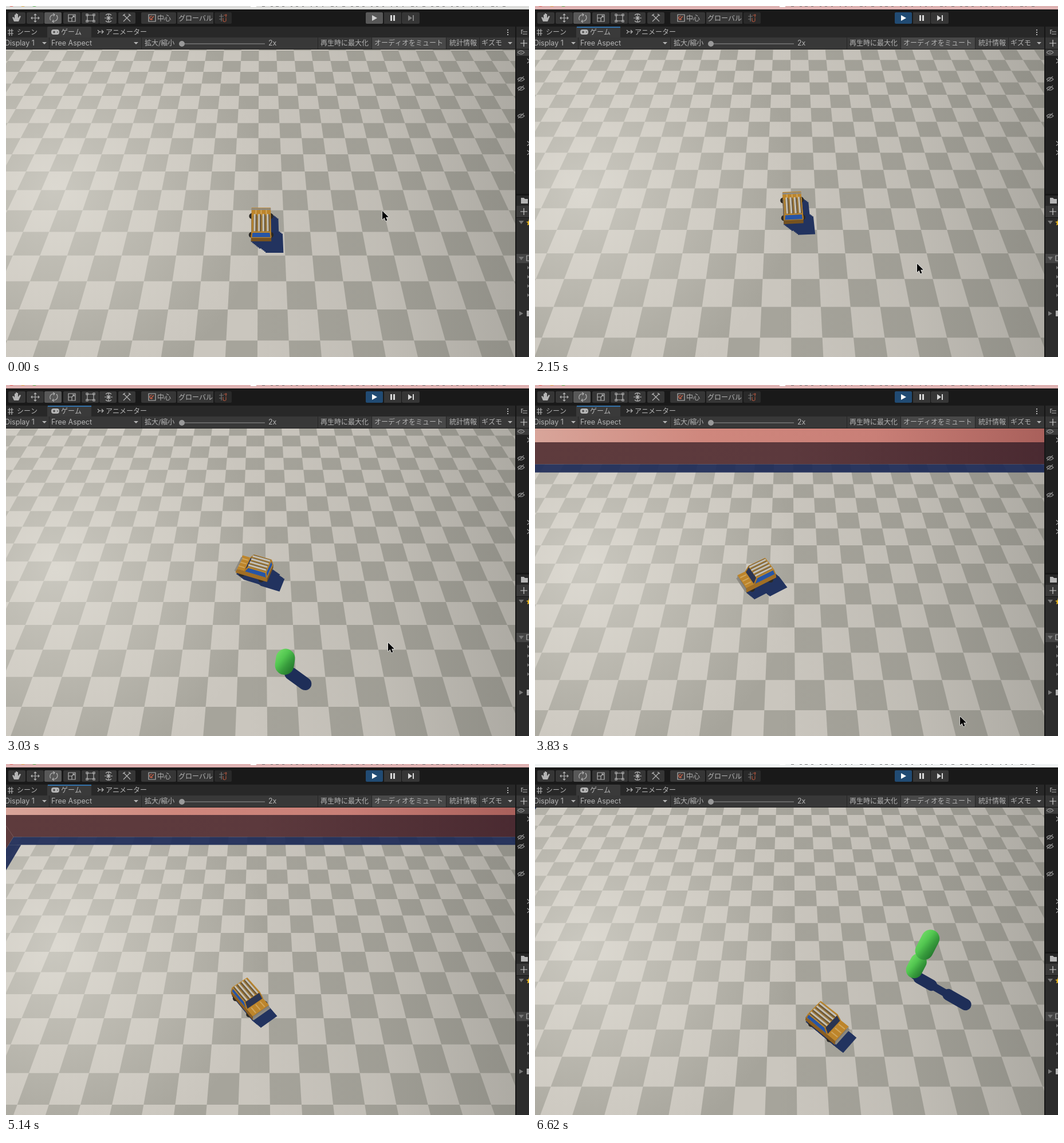
Recreate the animation shown at these times as an HTML page with a canvas. Size 913x613 px, loop 6.72 s.

```html
<!DOCTYPE html>
<html lang="ja">
<head>
<meta charset="utf-8">
<style>
  html, body { margin: 0; height: 100%; overflow: hidden; background: #191919; }
  canvas { display: block; }
</style>
</head>
<body>
<canvas id="stage" width="913" height="613"></canvas>
<script>
const c = document.getElementById('stage').getContext('2d');
const LOOP = 6720, STEP = 87.7, START = 1618;

// step, camera x, camera z, car x and z relative to the camera, heading in degrees
const KEYS = [
  [-1, .1, 0, .02, -9.78, 0],
  [6, -.05, .91, .12, -9.01, 3],
  [16, -.21, 4.6, -.25, -8.13, 70],
  [25, -1.18, 8.71, -1.32, -8.54, 122],
  [32, -3.16, 10.41, -1.25, -9.85, 196],
  [47, -4.6, 5.55, .43, -11, 225],
  [57, -2.23, 1.63, 1.32, -11.5, 227]
];
const WALL_Z = 7.58, WALL_X = -17.45, WALL_H = 1.29, WALL_DEPTH = 2.42;
const cam = { x: 0, z: 0 };

// Smooth curve through the keys
function pose(n) {
  n = Math.max(-1, Math.min(57, n));
  let i = 0;
  while (i < KEYS.length - 2 && n > KEYS[i + 1][0]) i++;
  const a = KEYS[i], b = KEYS[i + 1], h = b[0] - a[0], s = (n - a[0]) / h;
  const before = KEYS[Math.max(0, i - 1)], after = KEYS[Math.min(KEYS.length - 1, i + 2)];
  return a.map((v, k) => {
    const m0 = i ? (b[k] - before[k]) / (b[0] - before[0]) : 0;
    const m1 = (after[k] - v) / (after[0] - a[0]);
    return v * (1 + 2 * s) * (1 - s) ** 2 + b[k] * s * s * (3 - 2 * s)
      + h * s * (1 - s) * (m0 * (1 - s) - m1 * s);
  });
}

// Tilted camera: world units are floor tiles
function project(x, z, y = 0) {
  const d = 16.917 + z - cam.z, up = 11.914 - y;
  const scale = 625.9 / (.5695 * d + .822 * up);
  return [444.5 + (x - cam.x) * scale, 344.5 + (.5695 * up - .822 * d) * scale, scale];
}

function poly(points, fill) {
  c.beginPath();
  points.forEach(p => c.lineTo(p[0], p[1]));
  c.closePath();
  c.fillStyle = fill;
  c.fill();
}

function line(points, color, width) {
  c.beginPath();
  points.forEach(p => c.lineTo(p[0], p[1]));
  c.strokeStyle = color;
  c.lineWidth = width;
  c.stroke();
}

function rect(x, y, w, h, fill, r = 0) {
  c.fillStyle = fill;
  c.beginPath();
  c.roundRect(x, y, w, h, r);
  c.fill();
}

function gradient(g, ...stops) {
  stops.forEach((s, i) => g.addColorStop(i / (stops.length - 1), s));
  return g;
}

const quad = (x0, x1, z0, z1, y = 0) =>
  [project(x0, z0, y), project(x1, z0, y), project(x1, z1, y), project(x0, z1, y)];

function floor() {
  rect(0, 76, 889, 537, '#cac6be');
  const x0 = Math.floor(cam.x) - 17, z0 = Math.floor(cam.z) - 17;
  for (let x = x0; x < x0 + 36; x++)
    for (let z = z0; z < z0 + 23; z++)
      if ((x + z) % 2 === 0) poly(quad(x, x + 1, z, z + 1), '#a6a49b');
  rect(0, 76, 889, 537, gradient(c.createRadialGradient(85, 320, 0, 85, 320, 370),
    'rgba(238,236,228,.5)', 'rgba(230,227,218,.3)', 'rgba(230,227,218,0)'));
  rect(0, 76, 889, 537, gradient(c.createLinearGradient(420, 0, 889, 0),
    'rgba(70,72,68,0)', 'rgba(70,72,68,.07)', 'rgba(70,72,68,.22)'));
}

function walls() {
  const shade = 'rgba(26,40,86,.9)', right = 25;
  poly(quad(WALL_X, right, WALL_Z - .67, WALL_Z), shade);
  poly(quad(WALL_X, WALL_X + .66, -20, WALL_Z - .67), shade);
  poly(quad(WALL_X - 9, right + 9, WALL_Z + WALL_DEPTH, WALL_Z + 14, WALL_H), '#8c8e8b');
  poly(quad(WALL_X, right, WALL_Z, WALL_Z + WALL_DEPTH, WALL_H),
    gradient(c.createLinearGradient(0, 0, 889, 0), '#d8a59a', '#cf877d', '#c97f77', '#a9605b'));
  const face = gradient(c.createLinearGradient(0, 0, 889, 0), '#5e3b3d', '#5c393d', '#4a2a31');
  const wallFace = (x0, z0, x1, z1) => poly([project(x0, z0), project(x1, z1),
    project(x1, z1, WALL_H), project(x0, z0, WALL_H)], face);
  wallFace(WALL_X, WALL_Z, right, WALL_Z);
  wallFace(WALL_X, cam.z - 14, WALL_X, WALL_Z);
}

function car(x, z, degrees) {
  const a = degrees * Math.PI / 180, sin = Math.sin(a), cos = Math.cos(a);
  const place = (u, w, y) => project(x - u * sin + w * cos, z + u * cos + w * sin, y);
  const cast = (u, w, y) => project(x - u * sin + w * cos + y * .82, z + u * cos + w * sin - y * .74);
  const ring = (f, front, back, w, y) => [f(front, w, y), f(front, -w, y), f(back, -w, y), f(back, w, y)];
  const facing = p => (p[1][0] - p[0][0]) * (p[2][1] - p[0][1]) - (p[1][1] - p[0][1]) * (p[2][0] - p[0][0]) < 0;

  function box(low, high, sides, top) {
    const b = ring(place, ...low), t = ring(place, ...high);
    b.forEach((p, i) => {
      const j = (i + 1) % 4, f = [p, b[j], t[j], t[i]];
      if (facing(f)) poly(f, sides[i]);
    });
    poly(t, top);
  }

  for (let y = 0; y <= .66; y += .06)
    poly(ring(cast, y < .4 ? .66 : .15, -.66, y < .4 ? .38 : .33, y), '#22335f');

  for (const w of [-.36, .36]) for (const u of [-.42, .42]) {
    const [px, py] = place(u, w, .12);
    c.fillStyle = '#2b2926';
    c.beginPath();
    c.arc(px, py, 5, 0, 7);
    c.fill();
  }
  box([.68, -.68, .38, .1], [.66, -.68, .37, .36], ['#85827a', '#a06e25', '#76521f', '#8a5d20'], '#bd852b');
  for (const w of [-.2, 0, .2]) line([place(.35, w, .37), place(.62, w, .37)], '#cfa55c', 2);
  line([place(.7, -.38, .2), place(.7, .38, .2)], '#8d8a82', 3);
  box([.3, -.65, .36, .36], [.14, -.6, .33, .64], ['#2b3552', '#2655a6', '#2655a6', '#2655a6'], '#9a7638');
  const low = ring(place, .3, -.65, .36, .36), roof = ring(place, .14, -.6, .33, .64);
  low.forEach((p, i) => {
    const j = (i + 1) % 4;
    if (facing([p, low[j], roof[j], roof[i]])) {
      line([p, roof[i]], '#ad7826', 2);
      line([low[j], roof[j]], '#ad7826', 2);
    }
  });
  line([...roof, roof[0]], '#bb852c', 2);
  for (let w = -.24; w < .3; w += .16) {
    line([place(.16, w + .05, .66), place(-.58, w + .05, .66)], '#64533a', 2);
    line([place(.16, w, .68), place(-.58, w, .68)], '#c2bfb6', 3);
  }
}

// Each part is a [low, high] pair of heights along the pillar
function pillar(x, z, parts) {
  const shadow = (low, high, width) => {
    const p = project(x + low * .77, z - low * .6), q = project(x + high * .77, z - high * .6);
    line([p, q], '#1e2e58', p[2] * width);
  };
  c.lineCap = 'round';
  shadow(.1, parts.at(-1)[1], .3);
  for (const [low, high] of parts) shadow(low, high, .44);
  for (const [low, high] of parts) {
    const p = project(x, z, low), q = project(x, z, high), r = q[2] * .31;
    const g = c.createLinearGradient(q[0] - r * .8, q[1] - r * .6, q[0] + r, q[1] + r * .9);
    line([p, q], gradient(g, '#6cd863', '#52c650', '#379b3c', '#257a2e'), r * 2);
  }
  c.lineCap = 'butt';
}

const INK = '#b4b4b4';

function text(s, x, y, size = 12) {
  c.font = size + 'px Inter, "Noto Sans CJK JP", sans-serif';
  c.fillStyle = INK;
  c.fillText(s, x, y);
}

function path(d, color, fill) {
  const p = new Path2D(d);
  c.lineWidth = 1.2;
  c.strokeStyle = c.fillStyle = color;
  fill ? c.fill(p) : c.stroke(p);
}

function toolbar(playing, tint) {
  rect(0, 0, 913, 76, '#191919');
  rect(0, 0, 913, 6, tint);
  if (tint !== '#f1f4f5')
    ['#e5635a', '#e0b04a', '#58b954'].forEach((s, i) => rect(5 + i * 20, -7, 9, 8, s, 4));
  rect(427, 0, 10, 2, '#fff');
  for (let x = 447; x < 880; x += 9 + x % 7) rect(x, 0, 2 + x % 4, 1, '#777');

  [4, 36, 67, 100, 132, 163, 196].forEach((x, i) => rect(x, 11, 30, 20, i === 2 ? '#585858' : '#363636', 2));
  rect(236, 11, 61, 20, '#363636', 2);
  rect(299, 11, 63, 20, '#363636');
  rect(364, 11, 30, 20, '#292929', 2);
  path('M14 27L11 20l2-1 2 3V15h2v5V13h2v7V14h2v7l3-4 2 1-4 9z', INK, true);
  path('M44 21h14M51 14v14M46 19l-2 2 2 2M56 19l2 2-2 2M49 16l2-2 2 2M49 26l2 2 2-2', INK);
  path('M78 25a6 6 0 0 1 2-9l5-1M88 16a6 6 0 0 1-2 10l-5 1M82 13l3 2-2 3M84 29l-3-2 2-3', INK);
  path('M109 15h12v12h-12zM109 21h6v6M115 21l4-4M116 17h3v3', INK);
  path('M142 16h11v10h-11zM140 14h3v3h-3zM152 14h3v3h-3zM140 25h3v3h-3zM152 25h3v3h-3z', INK);
  path('M172 21h14M179 14v14M174 16a7 7 0 0 1 10 0M174 26a7 7 0 0 0 10 0M176 18l6 6M182 18l-6 6', INK);
  path('M205 15l12 12M217 15L205 27M204 17l4-3M214 14l4 3', INK);
  path('M249 15h12v12h-12z', INK);
  path('M252 24l6-6M255 18a3 3 0 1 0 1 5', '#d0644a');
  text('中心', 264, 25.5);
  text('グローバル', 301, 25.5);
  path('M372 18h8M376 14v13M372 23h5', '#777');
  path('M380 16h6M384 14v6M379 21v5q3 3 5 0v-5', '#a8533d');

  rect(628, 11, 30, 20, playing ? '#214b73' : '#585858', 2);
  rect(660, 11, 30, 20, '#363636');
  rect(691, 11, 31, 20, '#363636', 2);
  path('M639 16v10l9-5z', playing ? '#fff' : '#d0d0d0', true);
  path('M671 16h3v10h-3zM676 16h3v10h-3z', '#d8d8d8', true);
  path('M702 16v10l7-5zM710 16h2v10h-2z', playing ? '#d8d8d8' : '#808080', true);

  rect(0, 36, 889, 19, '#282828');
  rect(72, 36, 77, 20, '#3a3a3a', 2);
  rect(0, 55, 889, 20, '#383838');
  path('M3 43h10M3 48h10M6 40v12M10 40v12', INK);
  text('シーン', 19, 50);
  rect(79, 41, 14, 9, INK, 4);
  path('M82 45.5h4M84 43.5v4M89 45.5h2', '#333');
  text('ゲーム', 96, 50);
  path('M160 42l3 3-3 3M162 45h8M167 42l3 3-3 3', INK);
  text('アニメーター', 174, 50);
  for (const y of [41, 45, 49]) rect(875, y, 2, 2, INK);

  rect(639, 55, 129, 20, '#484848');
  for (const x of [75, 236, 544, 638, 768, 826]) rect(x, 55, 1, 20, '#252525');
  text('Display 1', -2, 69, 12.5);
  text('Free Aspect', 79, 69, 12.5);
  for (const x of [67, 227, 880]) path(`M${x - 4} 63h8l-4 4z`, INK, true);
  text('拡大/縮小', 242, 69);
  rect(302, 65, 150, 2, '#666');
  rect(302, 61, 10, 10, '#999', 5);
  text('2x', 458, 69, 12.5);
  text('再生時に最大化', 549, 69);
  text('オーディオをミュート', 643, 69);
  text('統計情報', 774, 69);
  text('ギズモ', 830, 69);
  rect(0, 75, 913, 1, '#1f1f1f');
}

function sidePanel() {
  rect(889, 36, 24, 577, '#161616');
  rect(891, 36, 22, 19, '#282828');
  rect(891, 55, 22, 20, '#383838');
  rect(891, 76, 22, 252, '#202020');
  rect(891, 76, 22, 11, '#3c3c3c');
  rect(891, 331, 22, 18, '#282828');
  rect(891, 349, 22, 20, '#383838');
  rect(891, 370, 22, 243, '#2c2c2c');
  rect(891, 433, 22, 16, '#444');
  path('M899 42h4M902 45h8M902 49h8M900 42v7', INK);
  for (const y of [65, 359]) path(`M898 ${y}h12M904 ${y - 6}v12`, '#d0d0d0');
  for (const y of [81, 128, 144, 192]) {
    path(`M893 ${y}q6-6 12 0q-6 6-12 0M897 ${y}h4`, '#8a8a8a');
    if (y > 90) path(`M894 ${y + 4}l10-9`, '#8a8a8a');
  }
  for (const y of [96, 240, 256]) path(`M910 ${y - 4}l4 4-4 4`, '#aaa');
  path('M899 335h5l2 2h5v8h-12z', INK, true);
  for (const y of [378, 441]) path(`M895 ${y - 3}h9l-4.5 6z`, '#777', true);
  path('M913 372l-1 4-4 1 3 2-1 4 3-1z', '#e0b020', true);
  path('M909 436h6v9h-6z', INK);
  for (const y of [457, 473, 489, 505]) path(`M910 ${y - 3}v6l4-3z`, '#777', true);
  path('M896 533v8l7-4z', '#777', true);
  path('M909 532h5v10h-5z', INK, true);
}

function cursor(x, y) {
  const d = `M${x} ${y}v15l3.5-3.2 2.4 5.6 2.6-1.1-2.4-5.5h4.9z`;
  c.lineJoin = 'round';
  path(d, '#fff');
  path(d, '#000', true);
}

function draw(t) {
  const n = t < 1620 ? -1 : Math.floor((t - START) / STEP);
  const [, cx, cz, carX, carZ, heading] = pose(n);
  cam.x = cx;
  cam.z = cz;
  c.save();
  c.beginPath();
  c.rect(0, 76, 889, 537);
  c.clip();
  floor();
  walls();
  if (n >= 12 && n < 25) pillar(.6, -7.7, [[.3, .9]]);
  car(cx + carX, cz + carZ, heading);
  if (n >= 51) pillar(2.6, -7.65, [[.3, .85], [1.55, 2.25]]);
  c.restore();

  const playing = t >= 1170, tinted = t >= 1260 && t < 6530;
  toolbar(playing, tinted ? '#dfb3b3' : playing ? '#f1f4f5' : '#dededc');
  if (tinted) rect(73, 36, 76, 2, '#3371a8');
  sidePanel();
  const s = Math.max(0, Math.min(1, (n - 17) / 7));
  if (t < 1170) cursor(657, 358);
  else if (n < 35) cursor(667 + 75 * s + (n > 28), 450 + 129 * s + (n > 28) * 3);
}

function tick(now) {
  draw(now % LOOP);
  requestAnimationFrame(tick);
}
requestAnimationFrame(tick);
</script>
</body>
</html>
```
